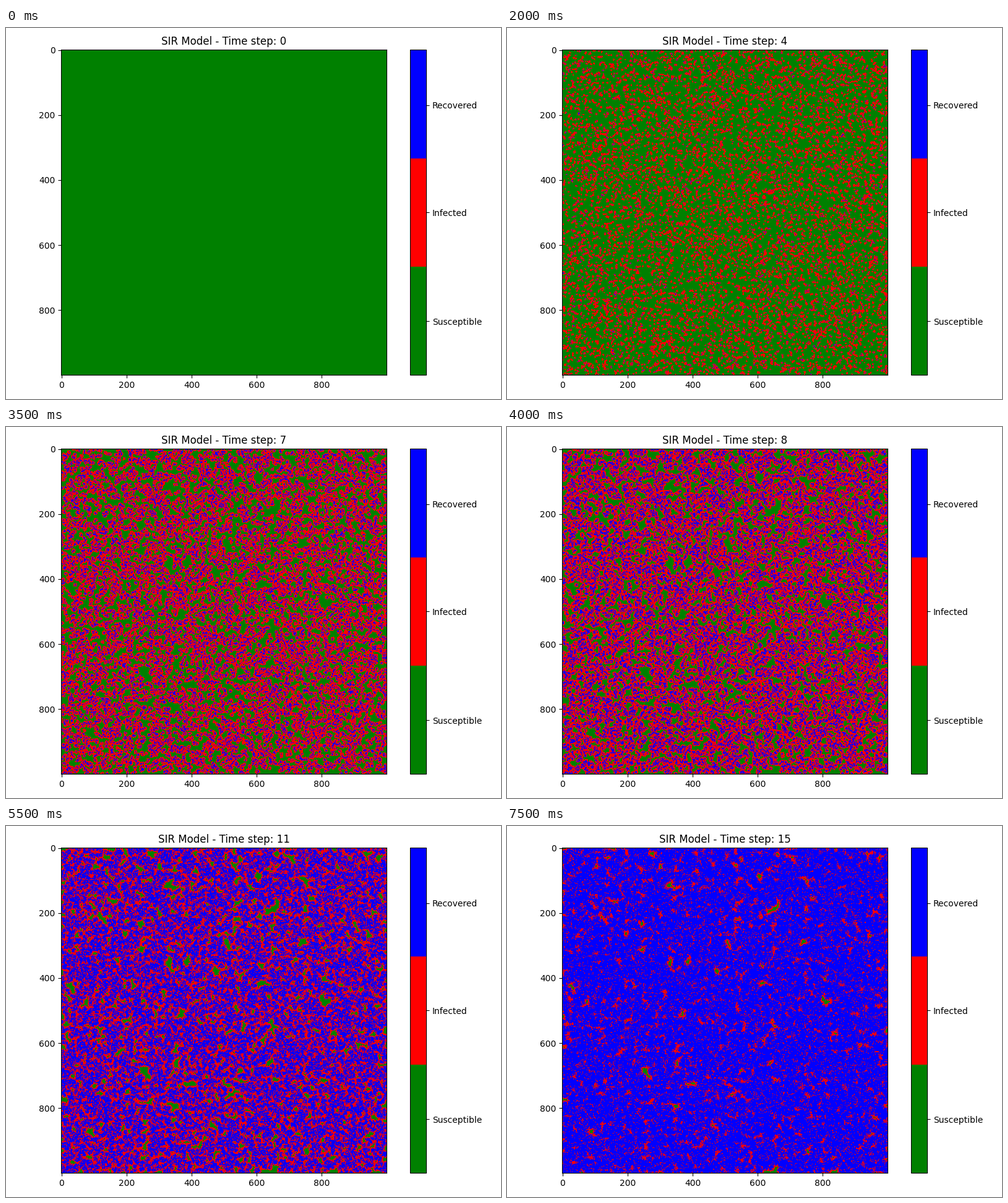
A matplotlib script that plays this animation: 800x600 px, repeating every 8 s.

```python
import numpy as np
import matplotlib.pyplot as plt
from matplotlib.animation import FuncAnimation
from matplotlib.colors import ListedColormap

W, H, DPI = 800, 600, 100
SIZE, STEPS, INTERVAL = 1000, 16, 500
BETA, GAMMA, SEED_SHARE = 0.37, 0.1, 0.01
S, I, R = 0, 1, 2

rng = np.random.default_rng(7)


def infected_neighbours(grid):
    """Count infected cells among the eight neighbours."""
    p = np.pad((grid == I).astype(np.uint8), 1)
    rows = p[:-2] + p[1:-1] + p[2:]
    return rows[:, :-2] + rows[:, 1:-1] + rows[:, 2:] - p[1:-1, 1:-1]


def advance(grid):
    risk = 1 - (1 - BETA) ** np.arange(9)
    roll = rng.random(grid.shape)
    new = grid.copy()
    new[(grid == S) & (roll < risk[infected_neighbours(grid)])] = I
    new[(grid == I) & (roll < GAMMA)] = R
    return new


def simulate():
    grids = [(rng.random((SIZE, SIZE)) < SEED_SHARE).astype(np.uint8)]
    while len(grids) < STEPS:
        grids.append(advance(grids[-1]))
    return grids


def add_axes(left, top, width, height):
    """Place axes by pixels measured from the top left."""
    return fig.add_axes([left / W, 1 - (top + height) / H,
                         width / W, height / H])


grids = simulate()

fig = plt.figure(figsize=(W / DPI, H / DPI), dpi=DPI, facecolor="white")
TOP, SIDE = 35.33, 525.95
ax = add_axes(89.3, TOP, SIDE, SIDE)
cax = add_axes(653, TOP, SIDE / 20, SIDE)

cmap = ListedColormap(["green", "red", "blue"])
image = ax.imshow(grids[0], cmap=cmap, vmin=S, vmax=R, aspect="auto")
title = ax.set_title("SIR Model - Time step: 0")

bar = fig.colorbar(image, cax=cax, ticks=[0.33, 1, 1.66])
bar.ax.set_yticklabels(["Susceptible", "Infected", "Recovered"])


def update(step):
    image.set_data(grids[step])
    title.set_text(f"SIR Model - Time step: {step}")
    return image, title


anim = FuncAnimation(fig, update, frames=STEPS, interval=INTERVAL,
                     repeat=True, repeat_delay=0, blit=False)
plt.show()
```
